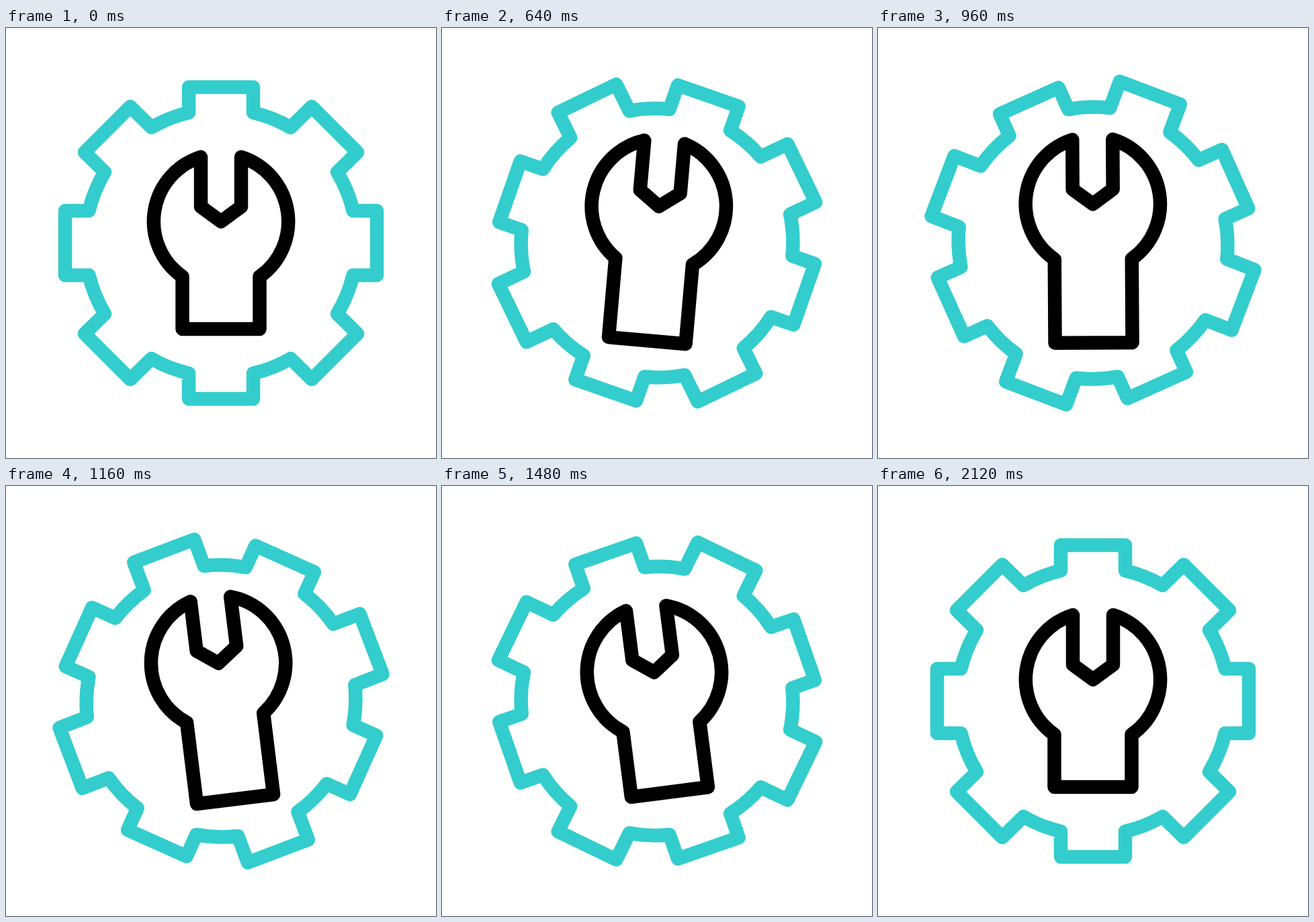
Write an HTML page that moves like this. It is 640 px wide and 640 px high and loops after 2160 ms.

```html
<!DOCTYPE html>
<html lang="en">
<head>
<meta charset="utf-8">
<title>Gear and wrench</title>
<style>
  html, body { margin: 0; width: 100%; height: 100%; overflow: hidden; background: #fff; }
  svg { display: block; width: 100vw; height: 100vh; }
  path { fill: none; stroke-width: 20.5; stroke-linejoin: round; stroke-linecap: round; }
</style>
</head>
<body>
<svg viewBox="-320 -320 640 640">
  <path id="gear" stroke="#33cdcd"/>
  <path id="wrench" stroke="#000"/>
</svg>
<script>
const LOOP = 2160, STEP = 40;
const gear = document.getElementById('gear');
const wrench = document.getElementById('wrench');

// Keys are [time, value], eased between neighbours.
const spin = [[40, 0], [2080, 180]];
const tilt = [[80, 0], [640, 5], [1320, -7.8], [2000, 0]];
const stretch = [[40, 0], [920, 1], [1985, 0]];

// Cubic bezier (.65, 0, .35, 1), solved for x by bisection.
function ease(x) {
  let lo = 0, hi = 1;
  for (let i = 0; i < 24; i++) {
    const s = (lo + hi) / 2;
    if (1.95 * s - 2.85 * s * s + 1.9 * s ** 3 < x) lo = s; else hi = s;
  }
  return lo * lo * (3 - 2 * lo);
}

function valueAt(keys, t) {
  if (t <= keys[0][0]) return keys[0][1];
  for (let i = 1; i < keys.length; i++) {
    const [t0, a] = keys[i - 1], [t1, b] = keys[i];
    if (t < t1) return a + (b - a) * ease((t - t0) / (t1 - t0));
  }
  return keys[keys.length - 1][1];
}

// One quarter of the outline, mirrored into the other three.
function gearPath() {
  const quarter = [[48, -232], [48, -194], [103.5, -172], [135, -203],
                   [203, -135], [173, -105.5], [196.5, -48], [232, -48]];
  const mirror = (sx, sy) => quarter.map(([x, y]) => [x * sx, y * sy]);
  const points = [mirror(1, 1), mirror(1, -1).reverse(),
                  mirror(-1, -1), mirror(-1, 1).reverse()].flat();
  return points.map((p, i) => {
    const k = i % 8;
    const cmd = i === 0 ? 'M' : k === 2 || k === 6 ? 'A202 202 0 0 1 ' : 'L';
    return cmd + p;
  }).join('') + 'Z';
}

function wrenchPath(extra) {
  const end = 128 + extra;
  return `M-30 -128V-54L0 -32L30 -54V-128A100.5 100.5 0 0 1 57.5 50` +
         `V${end}H-57.5V50A100.5 100.5 0 0 1 -30 -128Z`;
}

function draw(t) {
  const amount = valueAt(stretch, t);
  gear.setAttribute('transform', `rotate(${valueAt(spin, t)})`);
  wrench.setAttribute('d', wrenchPath(46.5 * amount));
  wrench.setAttribute('transform',
    `translate(0 ${-26 * amount}) rotate(${valueAt(tilt, t)})`);
}

gear.setAttribute('d', gearPath());
draw(0);
const start = performance.now();
function tick() {
  const t = (performance.now() - start) % LOOP;
  draw(Math.floor(t / STEP) * STEP);
  requestAnimationFrame(tick);
}
requestAnimationFrame(tick);
</script>
</body>
</html>
```
